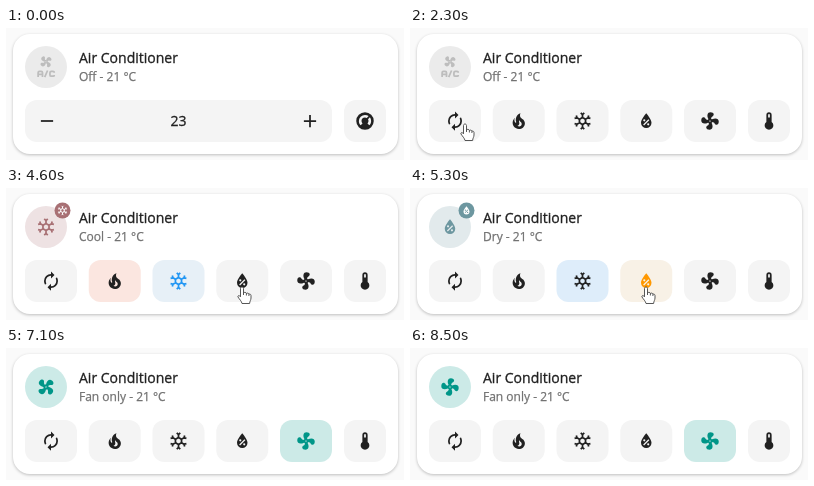
An HTML page for the animation above (8600 ms loop, 398 px wide and 132 px high).

```html
<!DOCTYPE html>
<html lang="en">
<head>
<meta charset="utf-8">
<title>Climate card</title>
<style>
  html, body { margin: 0; width: 100%; height: 100%; overflow: hidden; background: #fafafa; }
  svg { display: block; width: 100%; height: 100%; }
  text { font-family: "Open Sans", "Noto Sans", sans-serif; }
  .title { font-size: 14px; fill: #212121; stroke: #212121; stroke-width: .3px; }
  .status { font-size: 12px; fill: #727272; stroke: #727272; stroke-width: .25px; }
  .card { filter: drop-shadow(0 1px 1.5px rgba(0, 0, 0, .24)); }
</style>
</head>
<body>
<svg viewBox="0 0 398 132">
  <defs id="icons"></defs>
  <rect class="card" x="7" y="6" width="385" height="120" rx="17" fill="#fff"/>
  <g id="stage"></g>
</svg>
<script>
const LOOP = 8600, STEP = 100, FADE = 280, VIEW_SWITCH = 1200;
const INK = '#212121', PLAIN = [244, 244, 244];
const ORANGE_RED = [255, 87, 34], BLUE = [33, 150, 243], AMBER = [255, 152, 0], TEAL = [0, 150, 136];

// Icons live on a 24 x 24 grid.
const spin = (count, shape) => Array.from({ length: count },
  (_, i) => `<g transform="rotate(${i * 360 / count} 12 12)">${shape}</g>`).join('');
const solid = d => `<path fill="currentColor" fill-rule="evenodd" d="${d}"/>`;
const line = d => `<path fill="none" stroke="currentColor" stroke-width="2" d="${d}"/>`;
const fan = spin(4, solid('M12 11L12 12L10.13 9.65C8.13 5.95 8.92 2 12.5 2C17 2 17.11 5.57 14.75 6.75C13.76 7.24 13.32 8.29 13.13 9.22L14.35 10.13L13 12A1 1 0 0 0 12 11Z'));
const icons = {
  fan,
  aircon: `<g transform="translate(12 6) rotate(45) scale(.7) translate(-12 -12)">${fan}</g>` +
    line('M3 23.5V18.5Q3 17 4.5 17H6.5Q8 17 8 18.5V23.5M3 20.5H8M10.5 23.5L13.8 16M21.5 18.5Q21.5 17 20 17H18Q16.5 17 16.5 18.5V21Q16.5 22.5 18 22.5H20Q21.5 22.5 21.5 21'),
  auto: spin(2, solid('M12 6V9L16 5L12 1V4A8 8 0 0 0 4 12C4 13.57 4.46 15.03 5.24 16.26L6.7 14.8C6.25 13.97 6 13 6 12A6 6 0 0 1 12 6Z')),
  heat: solid('M14 3C13 5 13.3 7.3 14.8 8.7C16 9.8 17 10.2 17.7 11.2C20 14.3 19 17.6 17 19.3C13 22.6 7.8 20.8 6 17.7C4 14 5.5 10.2 7.5 8.6C6.7 10.3 6.9 12.3 8 13.8C8.6 14.5 9.3 14 9.1 13.2C7.6 9 9.8 4.2 14 3ZM14.5 17.5C15.8 16.2 15.6 14.4 14.6 13.4C13.6 12.5 12.9 12.2 12.5 10.9C11.9 12.5 12.7 13.7 12.7 14.8C12.6 16.2 11.7 17 10.5 17.3C11.7 18.4 13.3 18.5 14.5 17.5Z'),
  cool: spin(6, line('M10 2.7L12 4.7L14 2.7M12 4.7V8L15.46 10')),
  dry: solid('M12 3.25C12 3.25 6 10 6 14A6 6 0 0 0 18 14C18 10 12 3.25 12 3.25ZM14.47 9.97L15.53 11.03L9.53 17.03L8.47 15.97ZM9.75 10A1.25 1.25 0 0 1 9.75 12.5A1.25 1.25 0 0 1 9.75 10ZM14.25 14.5A1.25 1.25 0 0 1 14.25 17A1.25 1.25 0 0 1 14.25 14.5Z'),
  thermometer: solid('M15 13V5A3 3 0 0 0 9 5V13A5 5 0 1 0 15 13M12 4A1 1 0 0 1 13 5V8H11V5A1 1 0 0 1 12 4Z'),
  thermostat: solid('M16.95 16.95L14.83 14.83C15.55 14.1 16 13.1 16 12C16 11.26 15.79 10.57 15.43 10L17.6 7.81C18.5 9 19 10.43 19 12C19 13.93 18.22 15.68 16.95 16.95M12 5C13.57 5 15 5.5 16.19 6.4L14 8.56C13.43 8.21 12.74 8 12 8A4 4 0 0 0 8 12C8 13.1 8.45 14.1 9.17 14.83L7.05 16.95C5.78 15.68 5 13.93 5 12A7 7 0 0 1 12 5M12 2A10 10 0 0 0 12 22A10 10 0 0 0 12 2Z'),
  minus: line('M5 12H19'),
  plus: line('M5 12H19M12 5V19')
};
document.getElementById('icons').innerHTML =
  Object.entries(icons).map(([name, shape]) => `<g id="${name}">${shape}</g>`).join('');

const modes = [
  { at: -FADE, icon: 'aircon', label: 'Off', color: [189, 189, 189], tint: [235, 235, 235] },
  { at: 2560, icon: 'auto', label: 'Heat/Cool', color: [72, 130, 84], tint: [214, 236, 215], badge: 'heat', badgeColor: ORANGE_RED },
  { at: 3370, icon: 'heat', label: 'Heat', color: ORANGE_RED, badge: 'heat' },
  { at: 4480, icon: 'cool', label: 'Cool', color: BLUE, badge: 'cool' },
  { at: 5190, icon: 'dry', label: 'Dry', color: AMBER, badge: 'dry' },
  { at: 5990, icon: 'fan', label: 'Fan only', color: TEAL }
];
const buttons = ['auto', 'heat', 'cool', 'dry', 'fan'];

// Pointer stops: time, x, y of the fingertip.
const pointerPath = [
  [300, 300, 150], [800, 357, 96], [1750, 357, 96], [2300, 55, 96], [2550, 55, 96],
  [2800, 101, 93], [3500, 101, 93], [3800, 168, 96], [4350, 168, 96], [4600, 236, 99],
  [5450, 236, 99], [5800, 299, 104], [6300, 299, 104], [6800, 310, 150]
];

const ease = p => p * p * (3 - 2 * p);
const mix = (a, b, p) => a.map((v, i) => v + (b[i] - v) * p);
const rgb = c => `rgb(${c.map(Math.round)})`;
const tintOf = mode => mode.tint || mix([255, 255, 255], mode.color, .2);

const icon = (name, x, y, size, color, angle = 0) =>
  `<use href="#${name}" color="${color}" transform="translate(${x} ${y}) rotate(${angle}) scale(${size / 24}) translate(-12 -12)"/>`;
const box = (x, width, color = PLAIN) =>
  `<rect x="${x}" y="72" width="${width}" height="42" rx="12" fill="${rgb(color)}"/>`;
const circle = (x, y, r, color) => `<circle cx="${x}" cy="${y}" r="${r}" fill="${rgb(color)}"/>`;

function header(mode, last, fade, t) {
  const angle = mode.icon === 'fan' ? (t - mode.at) * .36 : 0;
  const badgeColor = m => m.badgeColor || m.color;
  const from = last.badge ? badgeColor(last) : badgeColor(mode);
  return circle(40, 39, 21, mix(tintOf(last), tintOf(mode), fade)) +
    icon(mode.icon, 40, 39, 21, rgb(mix(last.color, mode.color, fade)), angle) +
    (mode.badge
      ? circle(56.5, 22.5, 8, mix(from, badgeColor(mode), fade)) + icon(mode.badge, 56.5, 22.5, 12, '#fff')
      : '') +
    `<text class="title" x="73" y="35">Air Conditioner</text>
     <text class="status" x="73" y="53">${mode.label} - 21 °C</text>`;
}

function temperatureControls() {
  return box(19, 307) + box(338, 42) +
    icon('minus', 41, 93, 21, INK) + icon('plus', 304, 93, 21, INK) +
    icon('thermostat', 359, 93, 21, INK) +
    '<text class="title" x="172.5" y="98" text-anchor="middle">23</text>';
}

function modeControls(mode, last, fade) {
  return buttons.map((name, i) => {
    const x = 19 + i * 63.75;
    const active = name === mode.icon;
    const back = active ? mix(PLAIN, tintOf(mode), fade)
      : name === last.icon ? mix(tintOf(last), PLAIN, fade) : PLAIN;
    return box(x, 52, back) + icon(name, x + 26, 93, 21, active ? rgb(mode.color) : INK);
  }).join('') + box(338, 42) + icon('thermometer', 359, 93, 21, INK);
}

function pointer(t) {
  const next = pointerPath.findIndex(stop => stop[0] > t);
  if (next < 1) return '';
  const a = pointerPath[next - 1], b = pointerPath[next];
  const [, x, y] = mix(a, b, ease((t - a[0]) / (b[0] - a[0])));
  return `<g transform="translate(${x} ${y})" fill="#fff" stroke="#444" stroke-width=".9" stroke-linejoin="round">
    <path d="M-1.5 1.5C-1.5 -.5 1.5 -.5 1.5 1.5V6C2 5 4.3 5.2 4.4 6.5C5 5.8 6.8 6 6.9 7.2C7.6 6.8 9 7.2 9 8.5V11C9 13 7.8 14 7.6 16.5H0C-.5 14 -2.5 12.5 -4 10C-4.6 8.8 -3 8 -2.2 9L-1.5 9.8Z"/>
    <path d="M1.5 6V8M4.4 6.5V8.5M6.9 7.2V9"/></g>`;
}

const stage = document.getElementById('stage');
let drawn = -1;

function draw(now) {
  const t = Math.floor(now % LOOP / STEP) * STEP;
  if (t !== drawn) {
    drawn = t;
    const index = modes.findLastIndex(m => m.at <= t);
    const mode = modes[index], last = modes[Math.max(0, index - 1)];
    const fade = ease(Math.min(1, (t - mode.at) / FADE));
    stage.innerHTML = header(mode, last, fade, t) +
      (t < VIEW_SWITCH ? temperatureControls() : modeControls(mode, last, fade)) +
      pointer(t);
  }
}

const start = performance.now();
function tick() {
  draw(performance.now() - start);
  requestAnimationFrame(tick);
}
tick();
</script>
</body>
</html>
```
